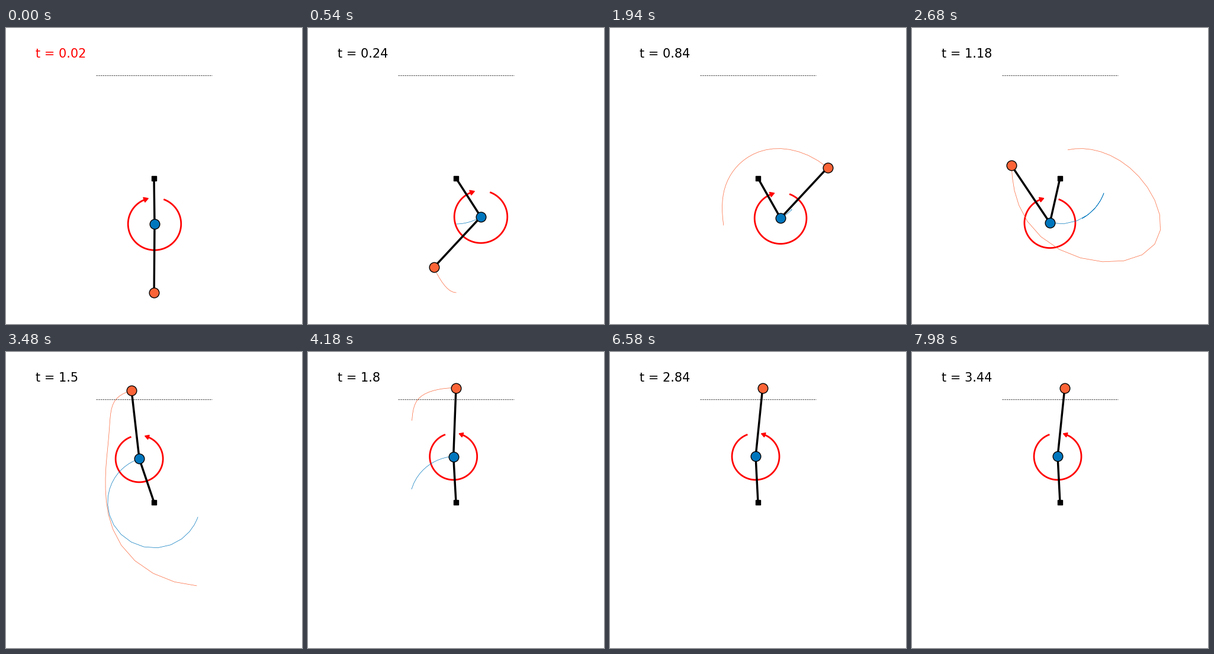
Animation of 500 by 500 pixels, one loop 8000 ms. Source, as a matplotlib script:

```python
import numpy as np
import matplotlib.pyplot as plt
from matplotlib.animation import FuncAnimation

PIVOT = np.array([250.0, 253.7])
SCALE = np.array([391.5, 386.5])   # pixels per metre
L1, L2 = 0.2, 0.3
TRAIL = 24
STEPS = 172
BLUE, ORANGE = "#0076BD", "#FB6437"

# swing-up poses: step, upper angle, lower angle (degrees from straight down)
POSES = np.array([
    (0, 0.7, -0.4), (5, 11, -13), (10, 29, -37), (17, 46, -77.2),
    (23, 44.6, -107.5), (34, 34, -165), (41, 29.1, -222.6), (45, 40.6, -271.5),
    (49, 68, -342.5), (52, 67.3, -398.7), (55, 36.8, -458), (58, -12.6, -506.5),
    (62, -74, -538.7), (66, -115, -538.8), (70, -140.5, -533.4),
    (74, -161.5, -533.6)])
BALANCE = np.array([-177.1, -545.8])
DECAY = np.array([0.27, 0.08])     # settling rate of each angle


def spline(x, xk, yk, start, end):
    """Clamped cubic spline with the given end slopes."""
    h = np.diff(xk)
    d = np.diff(yk, axis=0) / h[:, None]
    system = np.eye(len(xk))
    rhs = np.vstack((start, 3 * (d[:-1] / h[:-1, None] + d[1:] / h[1:, None]), end))
    for i in range(1, len(xk) - 1):
        system[i, i - 1:i + 2] = 1 / h[i - 1], 2 / h[i - 1] + 2 / h[i], 1 / h[i]
    m = np.linalg.solve(system, rhs)
    i = np.clip(np.searchsorted(xk, x, side="right") - 1, 0, len(h) - 1)
    w = h[i][:, None]
    s = (x - xk[i])[:, None] / w
    return ((1 + 2 * s) * (1 - s) ** 2 * yk[i] + s * (1 - s) ** 2 * w * m[i]
            + s * s * (3 - 2 * s) * yk[i + 1] + s * s * (s - 1) * w * m[i + 1])


def joint_angles(step):
    keys, angles = POSES[:, 0], POSES[:, 1:]
    last, offset = keys[-1], angles[-1] - BALANCE
    swing = spline(np.minimum(step, last), keys, angles, (0, 0), -DECAY * offset)
    late = np.maximum(step - last, 0)[:, None]
    settle = BALANCE + offset * np.exp(-DECAY * late)
    return np.where(late > 0, settle, swing)


def arm(length, deg):
    a = np.radians(deg)
    return length * SCALE * np.column_stack((np.sin(a), np.cos(a)))


def around(center, radius, deg):
    a = np.radians(deg)
    return np.column_stack((center[0] + radius * np.cos(a),
                            center[1] - radius * SCALE[1] / SCALE[0] * np.sin(a)))


step = np.arange(STEPS)
upper, lower = joint_angles(step).T
elbow = PIVOT + arm(L1, upper)
tip = elbow + arm(L2, lower)
radius = np.interp(step, (23, 58, 64), (44.8, 43, 40))
FLIP = 61                # torque turns counter-clockwise from here on

# uneven hold times in 20 ms ticks, with one late beat
ticks = np.resize([1, 5, 1], STEPS)
ticks[[23, 25]] = 5, 1
schedule = np.repeat(step, ticks)

fig = plt.figure(figsize=(5, 5), dpi=100, facecolor="white")
ax = fig.add_axes((0, 0, 1, 1))
ax.set(xlim=(0, 500), ylim=(500, 0))
ax.axis("off")

ax.plot((152, 348), (80, 80), "k--", lw=0.5)
torque, = ax.plot([], [], color="red", lw=2, solid_capstyle="butt", zorder=1)
head = ax.add_patch(plt.Polygon(np.zeros((3, 2)), color="red", lw=1, zorder=1))
elbow_trail, = ax.plot([], [], color=BLUE, lw=0.5, zorder=2)
tip_trail, = ax.plot([], [], color=ORANGE, lw=0.5, zorder=2)
links, = ax.plot([], [], color="black", lw=2.5, zorder=3)
ax.plot(*PIVOT[:, None], "ks", ms=6, zorder=4)
elbow_dot, = ax.plot([], [], "o", ms=12, mfc=BLUE, mec="black", zorder=4)
tip_dot, = ax.plot([], [], "o", ms=12, mfc=ORANGE, mec="black", zorder=4)
clock = ax.text(50, 50, "", fontsize=15, family="DejaVu Sans", va="baseline")


def update(tick):
    n = schedule[tick]
    past = slice(max(0, n - TRAIL), n + 1)
    elbow_trail.set_data(*elbow[past].T)
    tip_trail.set_data(*tip[past].T)
    links.set_data(*np.array((PIVOT, elbow[n], tip[n])).T)
    elbow_dot.set_data(*elbow[n][:, None])
    tip_dot.set_data(*tip[n][:, None])

    torque.set_data(*around(elbow[n], radius[n], np.linspace(110, 430, 90)).T)
    end, turn = (110, -90) if n < FLIP else (70, 90)
    base = around(elbow[n], radius[n], np.array([end]))[0]
    head.set_xy(around(base, radius[n] / 9, end + turn + np.array((0, 120, 240))))

    clock.set_text(f"t = {round(0.02 * (n + 1), 2)}")
    clock.set_color("red" if n % 20 == 0 and n < FLIP - 1 else "black")
    return torque, head, elbow_trail, tip_trail, links, elbow_dot, tip_dot, clock


anim = FuncAnimation(fig, update, frames=len(schedule), interval=20,
                     repeat=True, repeat_delay=0, blit=False)
plt.show()
```
